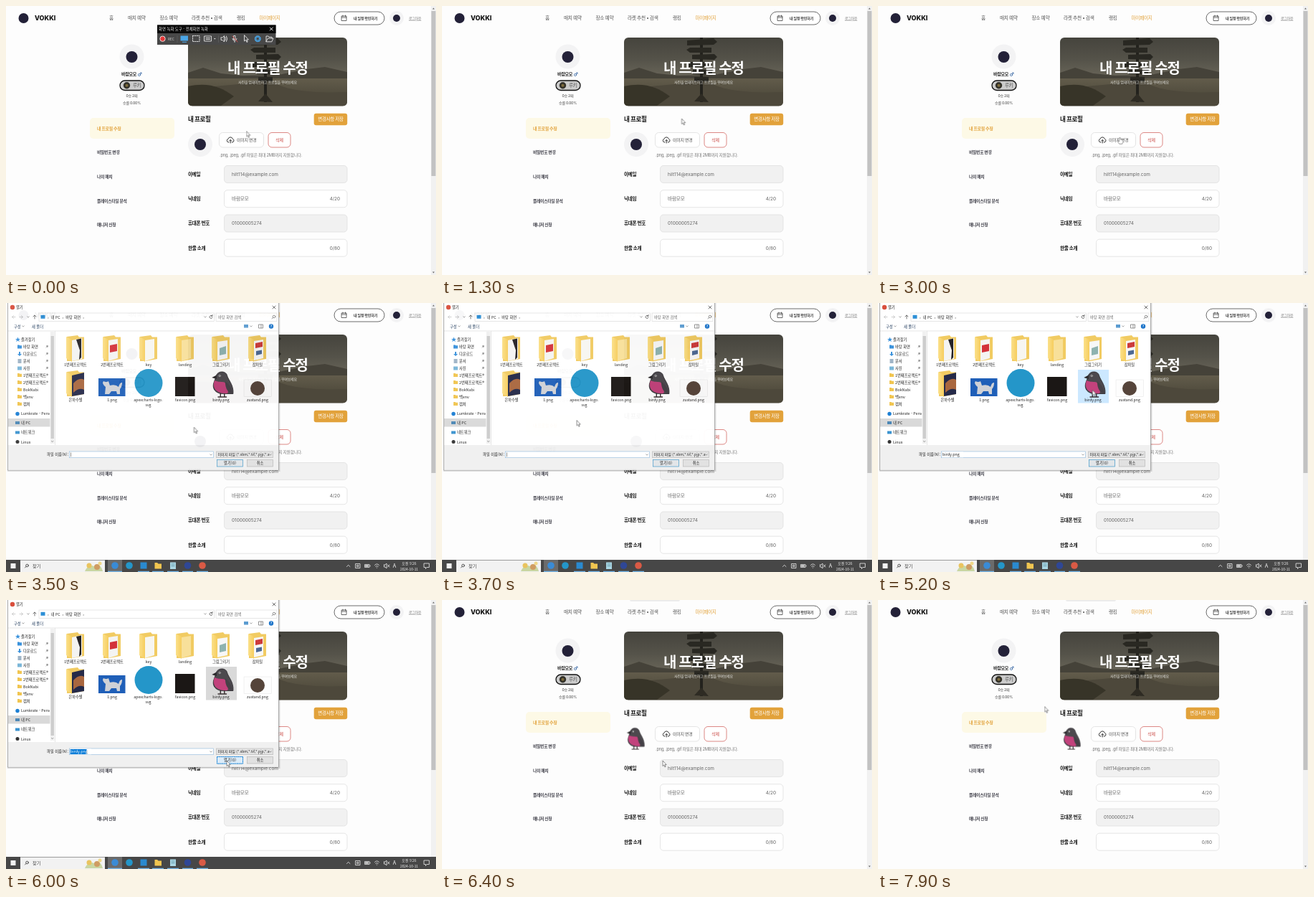
An HTML page for the animation above (8 s loop, 600 px wide and 375 px high).

```html
<!DOCTYPE html>
<html lang="ko">
<head>
<meta charset="utf-8">
<title>프로필 수정</title>
<style>
html, body { margin: 0; width: 100%; height: 100%; overflow: hidden; background: #fdfdfd; }
svg { display: block; }
text { white-space: pre; }
.page { font: 500 6.7px Inter, 'Noto Sans CJK KR', sans-serif; fill: #555; }
.page text { letter-spacing: -.05em; }
.page .lat, .page .lat text { letter-spacing: 0; }
.win { font: 5.3px 'Noto Sans CJK KR', 'Noto Sans', sans-serif; fill: #222; }
.mid { text-anchor: middle; }
.end { text-anchor: end; }
.b { font-weight: 700; }
.line { fill: none; stroke-linecap: round; stroke-linejoin: round; }
.menu { font-size: 5.8px; font-weight: 600; fill: #3c3c46; }
.label { font-size: 6.6px; font-weight: 700; fill: #111; }
.value { font-size: 6.4px; font-weight: 400; fill: #666; }
.small { font-size: 5.1px; }
.files { font-size: 5.2px; }

.a { animation: 8s linear infinite; }
.cursor { animation-name: move; }
.hand { animation-name: hand; }
.arrow { animation-name: arrow; }
.rec { animation-name: rec; }
.dialog { animation-name: dialog; }
.bar { animation-name: bar; }
.hover { animation-name: hover; }
.pick { animation-name: pick; }
.named { animation-name: named; }
.press { animation-name: press; }
.old { animation-name: old; }
.new { animation-name: new; }

@keyframes move {
  0%, 1.25% { transform: translate(335.5px, 174.5px); }
  8.75%, 16.25% { transform: translate(334.5px, 157px); animation-timing-function: ease-in-out; }
  26.25%, 41.25% { transform: translate(337.5px, 183px); }
  46.25% { transform: translate(188px, 163.5px); }
  52.5% { transform: translate(205px, 150px); }
  56.25% { transform: translate(247px, 130px); }
  61.25%, 63.75% { transform: translate(299px, 118px); animation-timing-function: ease-in-out; }
  73.75%, 83.75% { transform: translate(308px, 224px); animation-timing-function: ease-in-out; }
  91.25%, 95% { transform: translate(449px, 151px); }
  98.75%, 100% { transform: translate(232.5px, 148.5px); }
}
@keyframes hand {
  0%, 24% { opacity: 0; } 24.01%, 41.6% { opacity: 1; }
  41.61%, 90% { opacity: 0; } 90.01%, 95.5% { opacity: 1; }
  95.51%, 100% { opacity: 0; }
}
@keyframes arrow {
  0%, 24% { opacity: 1; } 24.01%, 41.6% { opacity: 0; }
  41.61%, 90% { opacity: 1; } 90.01%, 95.5% { opacity: 0; }
  95.51%, 100% { opacity: 1; }
}
@keyframes rec { 0%, 1.25% { opacity: 1; } 4%, 100% { opacity: 0; } }
@keyframes dialog {
  0%, 41.25% { opacity: 0; } 43.5% { opacity: .95; } 46.25% { opacity: .965; }
  50%, 75.5% { opacity: 1; } 77.5%, 100% { opacity: 0; }
}
@keyframes bar {
  0%, 41.25% { transform: translateY(18px); } 43.5%, 76% { transform: none; }
  79%, 100% { transform: translateY(18px); }
}
@keyframes hover { 0%, 53.5% { opacity: 0; } 53.51%, 58.5% { opacity: 1; } 58.51%, 100% { opacity: 0; } }
@keyframes pick {
  0%, 59% { fill: #e5f3ff00; } 59.01%, 61.5% { fill: #e5f3ff; }
  61.51%, 73% { fill: #cce8ff; } 73.01%, 100% { fill: #d9d9d9; }
}
@keyframes named { 0%, 61.5% { opacity: 0; } 61.51%, 100% { opacity: 1; } }
@keyframes press { 0%, 72.5% { opacity: 0; } 72.51%, 100% { opacity: 1; } }
@keyframes old { 0%, 78.7% { opacity: 1; } 78.71%, 100% { opacity: 0; } }
@keyframes new { 0%, 78.7% { opacity: 0; } 78.71%, 100% { opacity: 1; } }
</style>
</head>
<body>
<svg width="600" height="375" viewBox="0 0 600 375">
<defs>
  <linearGradient id="sky" x2="0" y2="1">
    <stop stop-color="#45443d"/><stop offset=".5" stop-color="#545249"/><stop offset="1" stop-color="#6c685b"/>
  </linearGradient>
  <linearGradient id="land" x2="0" y2="1">
    <stop stop-color="#625c4b"/><stop offset="1" stop-color="#444034"/>
  </linearGradient>
  <linearGradient id="fold" x2="1">
    <stop stop-color="#fbe08a"/><stop offset="1" stop-color="#f6cd5e"/>
  </linearGradient>
  <clipPath id="heroClip"><rect x="254" y="44" width="222" height="95.5" rx="6"/></clipPath>
  <clipPath id="sideClip"><rect x="3" y="40" width="58" height="156"/></clipPath>
  <g id="bird">
    <path d="M13 32V37M10 37.5H15M18 32V37M15.5 37.5H20.5" class="line" stroke="#3a3032" stroke-width="1.3"/>
    <path d="M7.500 9C8 1 20 0 21.500 8C23 14 30 21 29 33L19 33C8 34 1 27 5 16Z" fill="#4c494e" stroke="#2a272c" stroke-width=".8"/>
    <path d="M5.500 14.500C10 17 15 16 18 17C22 21 24 28 22 32.600C9 33.500 1.500 26 5.500 14.500Z" fill="#c2427c"/>
    <path d="M19 16C24 20 28 26 28.500 33C22 31 19 26 19 16Z" fill="#454147"/>
    <path d="M8 7L2 10.500L8 12.500Z" fill="#2c2a2d"/>
    <circle cx="12" cy="8" r="1.300" fill="#eee"/><circle cx="12" cy="8" r=".7"/>
  </g>
  <path id="folder" d="M-12 -17L3 -19L5 -16.500H12V14L-4 17H-12Z" fill="#f1cb62"/>
  <path id="flap" d="M-13 -17L-5 -13V18L-13 13Z" fill="url(#fold)"/>
  <path id="mini" d="M-3 -2.500H-.5L.3 -1.700H3V2.500H-3Z"/>
  <path id="pin" d="M-1.500 1.500L0 0M-.8 -1L1 .8L1.700 -1.300L.2 -1.800Z" fill="#888" stroke="#888" stroke-width=".5"/>
  <path id="chev" d="M-1.300 -.7L0 .7L1.300 -.7" class="line" stroke="#666" stroke-width=".6"/>
  <g id="lens" class="line"><circle r="1.800"/><path d="M-1.300 1.300L-3 3"/></g>
</defs>

<rect width="600" height="375" fill="#fdfdfd"/>

<g class="page">
  <!-- header -->
  <circle cx="24.500" cy="17" r="7" fill="#232138"/>
  <text x="40" y="20.300" class="lat" style="font-size:9px;font-weight:800;fill:#111">VOKKI</text>
  <text x="144" y="19.300">홈</text>
  <text x="170" y="19.300">매치 예약</text>
  <text x="214.500" y="19.300">장소 예약</text>
  <text x="259" y="19.300">라켓 추천 • 검색</text>
  <text x="322" y="19.300">랭킹</text>
  <text x="353.500" y="19.300" fill="#e2a23b">마이페이지</text>
  <rect x="458" y="8" width="70" height="18" rx="9" fill="#fff" stroke="#444" stroke-width=".8"/>
  <path d="M468.500 14H475V20.500H468.500ZM468.500 16H475M470 13V14.500M473.500 13V14.500" class="line" stroke="#444" stroke-width=".8"/>
  <text x="485" y="19" style="font-size:5.1px;font-weight:600;fill:#333">내 일정 확인하기</text>
  <circle cx="545" cy="17" r="10" fill="#f3f3f4"/><circle cx="545" cy="17" r="5" fill="#232138"/>
  <text x="562" y="18.800" style="font-size:5px;fill:#777;text-decoration:underline">로그아웃</text>

  <!-- sidebar -->
  <circle cx="175.500" cy="70.500" r="17" fill="#f3f3f4"/><circle cx="175.500" cy="71" r="8" fill="#232138"/>
  <text x="161" y="97.300" class="b" style="font-size:6px;fill:#222">바람모모</text>
  <g class="line" stroke="#3f6ea8" stroke-width=".8"><circle cx="186" cy="96" r="1.600"/><path d="M187.200 94.800L189 93M187.300 93H189V94.700"/></g>
  <rect x="159" y="104" width="34" height="13.500" rx="6.700" fill="#cbcbcb" stroke="#111" stroke-width="1.300"/>
  <circle cx="168.500" cy="110.700" r="4.700" fill="#34322a"/><circle cx="168.500" cy="110.700" r="2" fill="#7d6b3c"/>
  <text x="177" y="113" style="font-size:6.4px">루키</text>
  <text x="175.500" y="126.600" class="mid small">0승 2패</text>
  <text x="175.500" y="137.200" class="mid small">승률 0.00%</text>
  <rect x="117" y="156" width="118" height="29" rx="5" fill="#fdf9e6"/>
  <g class="menu">
    <text x="127" y="172.600" class="b" style="fill:#e2a23b;font-size:6px">내 프로필 수정</text>
    <text x="127" y="206.300">비밀번호 변경</text>
    <text x="127" y="240">나의 매치</text>
    <text x="127" y="273.700">플레이스타일 분석</text>
    <text x="127" y="307.400">매니저 신청</text>
  </g>

  <!-- hero -->
  <g clip-path="url(#heroClip)">
    <rect x="254" y="44" width="222" height="60" fill="url(#sky)"/>
    <path d="M254 93L275 86L300 94L330 97L380 96L420 88L445 85L476 92V106H254Z" fill="#454239"/>
    <rect x="254" y="101" width="222" height="39" fill="url(#land)"/>
    <path d="M254 118C300 108 330 112 345 104L372 104C385 118 430 122 476 120V139H254Z" fill="#4d483b"/>
    <path d="M254 112C280 106 300 112 318 126L300 139H254Z" fill="#373428"/>
    <path d="M360 44H364V134H360Z" fill="#23221d"/>
    <path d="M342 48L379 45L384 50L379 54L342 55ZM346 58H376V65H346L341 61ZM349 68L380 67L384 71L380 75L349 74ZM344 78H374V85H344ZM350 88L377 89V96L350 95ZM352 99H372V105H352Z" fill="#292822"/>
    <path d="M352 133L362 122L372 134Z" fill="#2e2b23"/>
  </g>
  <text x="365" y="94.300" class="mid b" style="font-size:20px;fill:#fff">내 프로필 수정</text>
  <text x="365" y="107.700" class="mid" style="font-size:5px;fill:#e4e4e0">사진을 업데이트하고 프로필을 꾸며보세요</text>

  <!-- form -->
  <text x="254" y="160.700" class="b" style="font-size:8.6px;fill:#111">내 프로필</text>
  <rect x="429.700" y="149.700" width="46.500" height="16.600" rx="3" fill="#e2a23b"/>
  <text x="453" y="160.400" class="mid" style="font-size:6.5px;fill:#fff">변경사항 저장</text>
  <g class="a old"><circle cx="271" cy="193" r="17" fill="#f3f3f4"/><circle cx="271" cy="193" r="8" fill="#232138"/></g>
  <use href="#bird" class="a new" transform="translate(256 176.500) scale(.9 .84)"/>
  <rect x="297.500" y="176.500" width="62" height="20.500" rx="5" fill="#fff" stroke="#dedede" stroke-width=".8"/>
  <path d="M311 190H310.300A2.500 2.500 0 0 1 310 185.200A3.300 3.300 0 0 1 316.300 185.200A2.500 2.500 0 0 1 316 190H315.300M313.200 191V186.700M311.700 188L313.200 186.500L314.700 188" class="line" stroke="#333" stroke-width="1"/>
  <text x="322" y="189" style="font-size:6px">이미지 변경</text>
  <rect x="366" y="176.500" width="31" height="20.500" rx="5" fill="#fff" stroke="#d46a66" stroke-width=".8"/>
  <text x="381.500" y="189" class="mid" style="font-size:6px;fill:#c8433f">삭제</text>
  <text x="298" y="210.300" style="font-size:5.8px;font-weight:400;fill:#777">.png, .jpeg, .gif 파일은 최대 2MB까지 지원합니다.</text>
  <g fill="#fff" stroke="#dfdfdf" stroke-width=".8">
    <rect x="304.500" y="222.500" width="171.500" height="24" rx="4.500" fill="#f1f1f1"/>
    <rect x="304.500" y="256.700" width="171.500" height="24" rx="4.500"/>
    <rect x="304.500" y="291" width="171.500" height="24" rx="4.500" fill="#f1f1f1"/>
    <rect x="304.500" y="325.200" width="171.500" height="24" rx="4.500"/>
  </g>
  <g class="label">
    <text x="254" y="237">이메일</text><text x="254" y="271.200">닉네임</text>
    <text x="254" y="305.400">휴대폰 번호</text><text x="254" y="339.600">한줄 소개</text>
  </g>
  <g class="value lat">
    <text x="315" y="237">hilt114@example.com</text>
    <text x="315" y="271.200">바람모모</text><text x="466" y="271.200" class="end">4/20</text>
    <text x="315" y="305.400">01000005274</text>
    <text x="466" y="339.600" class="end">0/80</text>
  </g>
</g>

<!-- page scrollbar -->
<rect x="593" width="7" height="375" fill="#f1f1f1"/>
<rect x="593.500" y="7" width="6" height="230" fill="#c2c2c2"/>
<path d="M595 4.500L596.500 2.500L598 4.500ZM595 370.500L596.500 372.500L598 370.500Z" fill="#666"/>
<rect class="a new" x="262" y="-2" width="70" height="4" rx="2" fill="#ececec"/>

<!-- recorder -->
<g class="win a rec">
  <rect x="211" y="26.500" width="165.500" height="27.500" fill="#484848"/>
  <rect x="211" y="26.500" width="165.500" height="11.500" fill="#080808"/>
  <text x="213" y="34.300" fill="#eee" style="font-size:5.4px">화면 녹화 도구 - 전체화면 녹화</text>
  <path d="M368.300 30L372.300 34M372.300 30L368.300 34" class="line" stroke="#fff" stroke-width=".9"/>
  <circle cx="218.500" cy="45.700" r="3.700" fill="#e23636" stroke="#eee" stroke-width=".9"/>
  <text x="226" y="47.600" fill="#ccc" style="font-size:4.800px">REC</text>
  <path d="M239 41V51M296.500 41V51" stroke="#666" stroke-width=".6"/>
  <rect x="243.500" y="41.500" width="10.500" height="7" fill="#4aa5e6"/><path d="M246 50.300H252" stroke="#4aa5e6"/>
  <g class="line" stroke="#e8e8e8" stroke-width=".9">
    <rect x="260.500" y="41.500" width="9.500" height="8" stroke-dasharray="1.500 1.300"/>
    <rect x="277" y="42" width="9.500" height="7"/><path d="M279 44.500H284.500M279 46.500H284.500"/>
    <path d="M300 44V47.500H302L304.500 50V41.500L302 44ZM306 43.500Q307.500 45.700 306 48M307.500 42Q310 45.700 307.500 49.500"/>
    <path d="M318 41.500H320V46.500H318ZM316 45.500Q316.500 48.300 319 48.300Q321.500 48.300 322 45.500M319 48.300V50.500"/>
    <path d="M316 42L323 50" stroke="#e65050"/>
    <path d="M332.500 41V49L334.500 47.300L336 50.500L337.200 50L335.800 47H338Z"/>
    <path d="M363 49.500V42H366L367 43.300H371V45M363 49.500L365.500 45H373L371 49.500Z"/>
  </g>
  <path d="M290 45L291.300 46.500L292.600 45Z" fill="#eee"/>
  <g class="line" stroke="#4aa5e6"><circle cx="351.300" cy="45.700" r="3.700" stroke-width="1.500" stroke-dasharray="2 .9"/><circle cx="351.300" cy="45.700" r="2.300"/></g>
</g>

<!-- file dialog -->
<g class="win a dialog">
  <rect x="2" y="-1" width="380.500" height="236" fill="#000" opacity=".13"/>
  <rect x="2.500" y="-1" width="378" height="234" fill="#fff" stroke="#8a8a8a" stroke-width=".7"/>
  <circle cx="9" cy="6" r="3.200" fill="#d94f3d"/>
  <text x="14" y="8">열기</text>
  <path d="M372 4L376 8M376 4L372 8" class="line" stroke="#333" stroke-width=".7"/>
  <g class="line" stroke="#555" stroke-width=".8">
    <path d="M13 19.500H8.500L10.500 17.500M8.500 19.500L10.500 21.500M19 19.500H23.500L21.500 17.500M23.500 19.500L21.500 21.500" stroke="#c4c4c4"/>
    <path d="M40 22V17L38 19M40 17L42 19"/>
    <path d="M287.500 18A2 2 0 1 0 288 20M288 16.500V18.300H286.300"/>
  </g>
  <use href="#chev" x="31" y="19.500"/><use href="#chev" x="278" y="19.500"/>
  <g fill="none" stroke="#dcdcdc" stroke-width=".7">
    <rect x="46" y="14" width="244.500" height="11.500"/><rect x="293" y="14" width="85" height="11.500"/>
    <path d="M3 39H380M68.500 39V198"/>
  </g>
  <rect x="48.500" y="16.800" width="6" height="5" fill="#2d8fd6"/>
  <text x="58" y="21.600">›  내 PC  ›  바탕 화면  ›</text>
  <text x="296" y="21.600" fill="#666">바탕 화면 검색</text>
  <use href="#lens" x="374" y="19" stroke="#666" stroke-width=".7"/>
  <text x="11" y="34.500" fill="#1e395b">구성</text><use href="#chev" x="24" y="32.500"/>
  <text x="36" y="34.500" fill="#1e395b">새 폴더</text>
  <rect x="332" y="30" width="6" height="4.500" fill="#5b9bd0"/><use href="#chev" x="342" y="32.500"/>
  <path d="M352.500 30H358.500V35H352.500ZM356 30V35" fill="none" stroke="#666" stroke-width=".7"/>
  <circle cx="370" cy="32.500" r="3.200" fill="#1c74c9"/><text x="370" y="34.300" class="mid b" fill="#fff" style="font-size:4.800px">?</text>

  <!-- places -->
  <rect x="3" y="161" width="58.500" height="11.500" fill="#d9d9d9"/>
  <g clip-path="url(#sideClip)">
    <path d="M16.500 47.500L17.500 50H20L18 51.500L18.800 54L16.500 52.500L14.200 54L15 51.500L13 50H15.500Z" fill="#3a92dc"/>
    <g fill="#3a92dc"><use href="#mini" x="19" y="61"/><path d="M18 68H20V71H22L19 74L16 71H18Z"/></g>
    <path d="M16.500 78H21.500V84H16.500Z" fill="#9fb4c6"/><path d="M16 88.500H22V93.500H16Z" fill="#7ab6d8"/>
    <g fill="#f1c550">
      <use href="#mini" x="19" y="100.500"/><use href="#mini" x="19" y="110.500"/><use href="#mini" x="19" y="120.500"/>
      <use href="#mini" x="19" y="130.500"/><use href="#mini" x="19" y="140.500"/>
    </g>
    <circle cx="16" cy="154.500" r="2.700" fill="#1c7fd4"/>
    <path d="M13 165H19V169H13Z" fill="#4c87b5"/><path d="M13 178.500H19V182.500H13Z" fill="#3b93cf"/>
    <circle cx="16" cy="193.500" r="2.500" fill="#333"/>
    <text x="21" y="53">즐겨찾기</text>
    <text x="24" y="63">바탕 화면</text><text x="24" y="73">다운로드</text><text x="24" y="82.700">문서</text>
    <text x="24" y="92.800">사진</text>
    <text x="24" y="102.600">1번째프로젝트</text><text x="24" y="112.600">2번째프로젝트</text>
    <text x="24" y="122.600">BokNabi</text><text x="24" y="132.600">백env</text><text x="24" y="142.600">캡처</text>
    <text x="21" y="156.300">Lumkrate - Person</text>
    <text x="21" y="169.200">내 PC</text><text x="21" y="182.400">네트워크</text><text x="21" y="195.600">Linux</text>
    <use href="#pin" x="57" y="61"/><use href="#pin" x="57" y="71"/><use href="#pin" x="57" y="81"/>
    <use href="#pin" x="57" y="91"/><use href="#pin" x="57" y="100.500"/><use href="#pin" x="57" y="110.500"/>
  </g>
  <rect x="62" y="40" width="5.500" height="156" fill="#f0f0f0"/><rect x="62.500" y="46" width="4.500" height="143" fill="#cdcdcd"/>
  <use href="#chev" x="64.700" y="193"/>

  <!-- files -->
  <rect class="a hover" x="228" y="93.500" width="42.500" height="46" fill="#e6ebf4"/>
  <rect class="a pick" x="279" y="93" width="43" height="46.500"/>
  <use href="#folder" x="97" y="64"/><path d="M92 52L106 49V78L92 81Z" fill="#f4f4f2"/><path d="M98 51L105 49.500V76L102 79L103 66Z" fill="#242226"/><use href="#flap" x="97" y="64"/>
  <use href="#folder" x="148" y="64"/><path d="M143 52L156 50V77L143 81Z" fill="#f4f4f2"/><path d="M145 59L155 57V67L145 69Z" fill="#d3323a"/><use href="#flap" x="148" y="64"/>
  <use href="#folder" x="199" y="64"/><path d="M194 52L207 50V77L194 81Z" fill="#f7f6f1"/><use href="#flap" x="199" y="64"/>
  <use href="#folder" x="250" y="64"/><path d="M245 52L258 50V77L245 81Z" fill="#f8e09a"/><use href="#flap" x="250" y="64"/>
  <use href="#folder" x="300" y="64"/><path d="M295 54L309 52V77L295 80Z" fill="#f7f7f7"/><path d="M298 63L307 60V71L298 73Z" fill="#8fb3b0"/><use href="#flap" x="300" y="64"/>
  <use href="#folder" x="351" y="64"/><path d="M346 53L359 51V77L346 80Z" fill="#f7f7f7"/><path d="M348 56L358 54V61L348 63Z" fill="#cc3b3b"/><path d="M349 67L357 65.500V71L349 73Z" fill="#4d6994"/><use href="#flap" x="351" y="64"/>
  <use href="#folder" x="97" y="113"/><path d="M92 101L109 97V127L92 130Z" fill="#252a49"/><path d="M94 112Q102 103 109 107V121Q102 117 94 125Z" fill="#a9673f"/><use href="#flap" x="97" y="113"/>
  <rect x="129" y="105" width="37.500" height="25" fill="#1f5fb8"/>
  <path d="M138 127L139 117Q133 112 136 109Q140 111 143 109L145 115Q153 113 157 117Q159 110 162 111Q162 117 159 120L159 127H155L154 123H147L144 127Z" fill="#cfd1d6"/>
  <circle cx="199" cy="111.500" r="19.500" fill="#2496c9"/>
  <rect x="236" y="103" width="27.500" height="27" fill="#1b1715"/>
  <use href="#bird" transform="translate(285 93.500) scale(1.100 1)"/>
  <rect x="332" y="107" width="38.500" height="23.500" fill="#fdfdfd" stroke="#e4e4e4" stroke-width=".5"/><circle cx="351" cy="119" r="10" fill="#55443a"/>
  <g class="files mid">
    <text x="97" y="87.700">1번째프로젝트</text><text x="148" y="87.700">2번째프로젝트</text><text x="199" y="87.700">key</text>
    <text x="250" y="87.700">landing</text><text x="300" y="87.700">그림그리기</text><text x="351" y="87.700">잡파일</text>
    <text x="97" y="136.700">은하수별</text><text x="148" y="136.700">1.png</text><text x="198.500" y="136.700">apexcharts-logo.</text>
    <text x="198.500" y="143.700">svg</text><text x="250" y="136.700">favicon.png</text><text x="300" y="136.700">birdy.png</text>
    <text x="351" y="136.700">zustand.png</text>
  </g>

  <!-- footer -->
  <rect x="3" y="198" width="377" height="34.700" fill="#f0f0f0"/>
  <text x="57" y="213.200">파일 이름(N):</text>
  <rect x="88.500" y="207" width="201" height="8.700" fill="#fff" stroke="#8bb6da" stroke-width=".6"/>
  <use href="#chev" x="286" y="211.500"/>
  <path class="a old" d="M90.500 208.500V214.300" stroke="#222" stroke-width=".5"/>
  <g class="a named"><rect x="89" y="207.500" width="30" height="7.800" fill="#fff"/><text x="90" y="213.200">birdy.png</text></g>
  <g class="a press"><rect x="89.500" y="208" width="23" height="6.900" fill="#0078d7"/><text x="90" y="213.200" fill="#fff">birdy.png</text></g>
  <rect x="293.500" y="207" width="79" height="8.700" fill="#e3e3e3" stroke="#b5b5b5" stroke-width=".6"/>
  <text x="295.500" y="213.200" style="font-size:5px">이미지 파일 (*.xbm;*.tif;*.pjp;*.a</text><use href="#chev" x="369" y="211.500"/>
  <rect x="294.500" y="218.500" width="36" height="9.500" fill="#e1e5e8" stroke="#3f97c9" stroke-width=".7"/>
  <rect class="a press" x="294.500" y="218.500" width="36" height="9.500" fill="#dcecf9" stroke="#0078d7" stroke-width=".8" stroke-dasharray="2 .6"/>
  <text x="312.500" y="225.200" class="mid">열기(O)</text>
  <rect x="336.500" y="218.500" width="36" height="9.500" fill="#e1e1e1" stroke="#b0b0b0" stroke-width=".6"/>
  <text x="354.500" y="225.200" class="mid">취소</text>
</g>

<!-- taskbar -->
<g class="win a bar">
  <rect y="358" width="600" height="17.500" fill="#474747"/>
  <rect x="6.500" y="363" width="7" height="7" fill="#f2f2f2"/>
  <rect x="20" y="358.500" width="118" height="17" fill="#f2f2f2"/>
  <use href="#lens" x="29.500" y="366" stroke="#333" stroke-width=".8"/>
  <text x="37" y="369" fill="#444" style="font-size:6.2px">찾기</text>
  <path d="M110 374Q115 363 123 367Q132 362 135 374Z" fill="#c9d6a2"/>
  <circle cx="116" cy="366" r="3.500" fill="#e9c45f"/><circle cx="127" cy="368" r="4" fill="#cf9c62"/><circle cx="131" cy="363" r="2.500" fill="#f0d889"/>
  <rect x="142" y="358" width="20" height="17" fill="#6b6b6b"/>
  <circle cx="152" cy="366" r="4.800" fill="#3a8bd6"/><circle cx="172" cy="366" r="4.800" fill="#2496c9"/>
  <rect x="187.500" y="361.500" width="9" height="9" fill="#2a8ad0"/>
  <path d="M207.500 362H211L212.500 363.500H217V370.500H207.500Z" fill="#f1c550"/>
  <path d="M229 361.500H237V371H229Z" fill="#a9d5e2"/><path d="M230.500 364H235.500M230.500 366.500H235.500" stroke="#4c8296" stroke-width=".7"/>
  <circle cx="253.500" cy="366" r="4.800" fill="#2f4796"/><circle cx="274" cy="366" r="4.800" fill="#d95a45"/>
  <path d="M142 374.300H162M184 374.300H200M204 374.300H220M225 374.300H241M246 374.300H261M266 374.300H282" stroke="#76b9ed" stroke-width="1.200"/>
  <g class="line" stroke="#eee" stroke-width=".8">
    <path d="M475.500 367.500L477.700 365.300L480 367.500"/>
    <path d="M488 363.500H494V369.500H488ZM490 365.500H492V367.500H490Z"/>
    <path d="M501 364.500H507V368.500H501ZM508 365.700V367.300"/><path d="M502 366.500H505" stroke-width="2"/>
    <path d="M514.500 365.500Q517.500 362 520.500 365.500M515.800 367.300Q517.500 365.500 519.200 367.300M517.500 369V369.200"/>
    <path d="M527.500 365V368H529L531 370V363L529 365ZM532.500 365L535 368M535 365L532.500 368"/>
    <path d="M583.500 363H590.500V368.500H587L585.500 370.500V368.500H583.500Z"/>
  </g>
  <g fill="#f2f2f2">
    <text x="542" y="369" class="mid" style="font-size:7.5px">A</text>
    <text x="562.500" y="365" class="mid" style="font-size:5px">오전 9:26</text>
    <text x="562.500" y="373" class="mid" style="font-size:4.900px">2024-10-11</text>
  </g>
</g>

<!-- pointer -->
<g class="a cursor">
  <path class="a arrow" d="M0 0V7.500L1.700 6L2.900 8.800L4.100 8.300L2.900 5.600H5.200Z" fill="#fff" stroke="#444" stroke-width=".6" stroke-linejoin="round"/>
  <path class="a hand" d="M-1 1Q0 -.6 1 1V3.200Q2.200 2.700 2.500 3.600Q4.300 3.300 4.300 5V7L3.300 9.300H-.8L-3 6Q-2.800 4.700 -1 6Z" fill="#fff" stroke="#555" stroke-width=".6" stroke-linejoin="round"/>
</g>
</svg>
</body>
</html>
```
